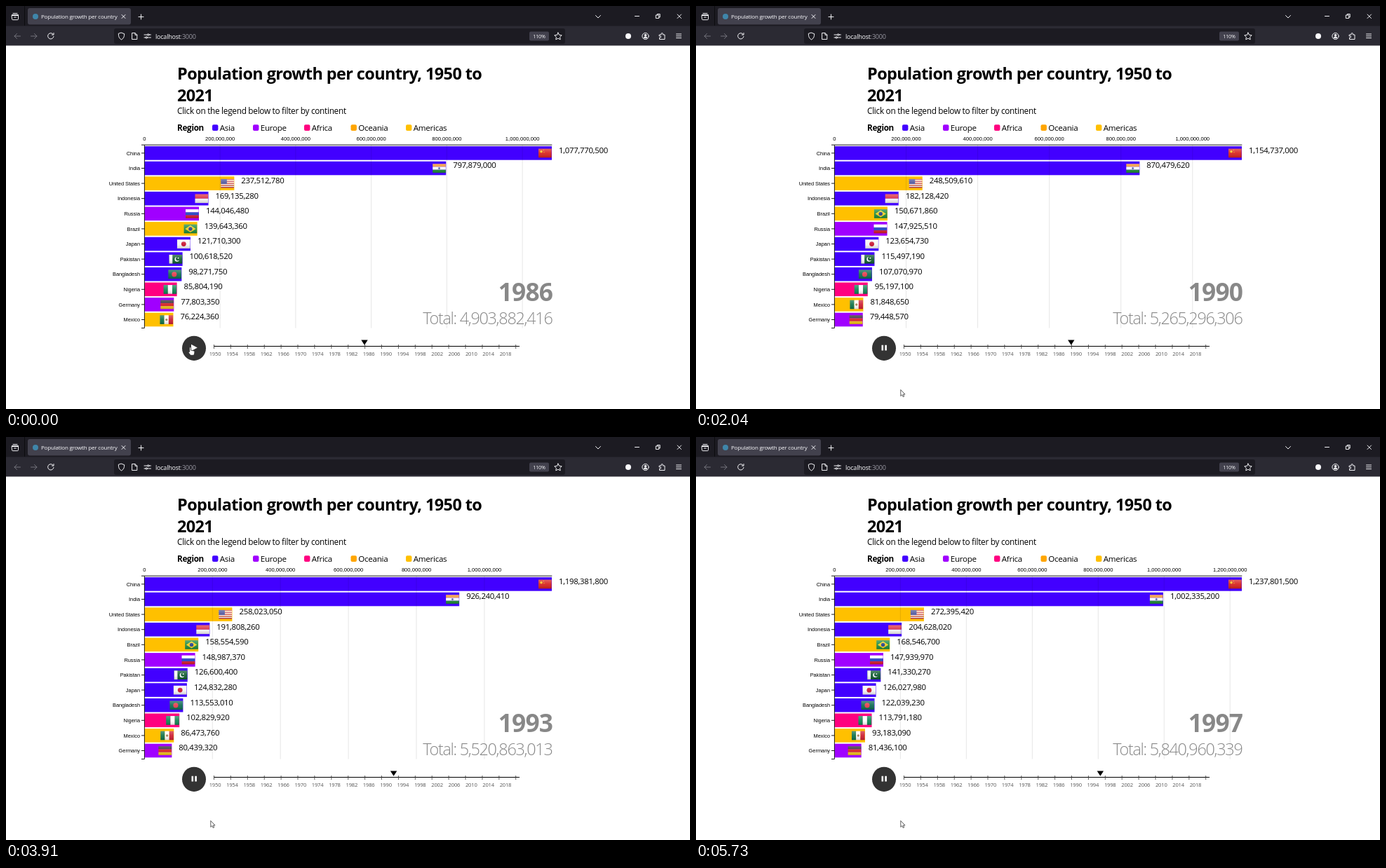
Recreate the animation shown at these times as an HTML page. Size 975 by 575 pixels, loop 5.81 s.

```html
<!DOCTYPE html>
<html lang="en">
<head>
<meta charset="utf-8">
<title>Population growth per country</title>
<style>
html, body { margin: 0; width: 100%; height: 100%; overflow: hidden; background: #fff; }
svg { display: block; }
text { font-family: "Open Sans", "Noto Sans", sans-serif; letter-spacing: -.024em; }
.axis { font: 7.6px "Liberation Sans", Arial, sans-serif; letter-spacing: 0; }
.name { font-size: 7.4px; }
.value { font-size: 11.4px; }
.bold { font-weight: 700; }
.mid { text-anchor: middle; }
.end { text-anchor: end; }
.icon { fill: none; stroke: #fbfbfe; stroke-width: .95; stroke-linecap: round; stroke-linejoin: round; }
</style>
</head>
<body>
<svg width="975" height="575" viewBox="0 0 975 575">
  <defs>
    <linearGradient id="shine" x2="0" y2="1">
      <stop offset="0" stop-color="#fff" stop-opacity=".3"/>
      <stop offset=".5" stop-color="#fff" stop-opacity=".08"/>
      <stop offset="1" stop-color="#000" stop-opacity=".16"/>
    </linearGradient>
  </defs>

  <g id="browser">
    <rect width="975" height="29" fill="#1c1b22"/>
    <rect y="28.5" width="975" height="28" fill="#2b2a33"/>
    <path d="M26.5 0V28" stroke="#0c0c0f"/>
    <rect x="31" y="3" width="147" height="23.5" rx="3" fill="#42414d"/>
    <circle cx="42" cy="15" r="4" fill="#3f86aa"/>
    <text x="50" y="18" font-size="8" fill="#fbfbfe">Population growth per country</text>
    <rect x="154" y="32" width="643" height="22" rx="3" fill="#1c1b22"/>
    <text x="213" y="46.5" font-size="9" fill="#fbfbfe">localhost<tspan fill="#9a99a3">:3000</tspan></text>
    <rect x="746" y="36.5" width="28" height="13" rx="2" fill="#42414d"/>
    <text x="760" y="45.7" font-size="7.2" fill="#fbfbfe" class="mid">110%</text>
    <g class="icon">
      <path d="M8.5 13.5h9v5q0 1.2-1.2 1.2h-6.6q-1.2 0-1.2-1.2zM8.5 13.5v-1h9v1M10 10.5h6M11.5 16h3"/>
      <path d="M165 12.5l5 5m0-5l-5 5M189 15.5h7m-3.5-3.5v7"/>
      <path d="M840.5 13.5l3.5 3.5l3.5-3.5M896.5 14.5h6M957 12l5.5 5.5m0-5.5l-5.5 5.5"/>
      <path d="M926.7 13h4v4.5h-4zM928.2 13v-1.5h4v4.5h-1.5"/>
      <path d="M20.5 43h-8.5m3.5-3.5l-3.5 3.5l3.5 3.5M35.5 43h8.5m-3.5-3.5l3.5 3.5l-3.5 3.5" stroke="#77767f"/>
      <path d="M67.2 40.3a4.2 4.2 0 1 0 .8 3.2M68 38.5v2.6h-2.6"/>
      <path d="M164.5 38.2l4.2 1.5c0 4.3-1.2 6.7-4.2 8.3c-3-1.6-4.2-4-4.2-8.3z"/>
      <path d="M180 38.5h4l2.8 2.8v6.2h-6.8zM184 38.5v2.8h2.8"/>
      <path d="M197 41h4.5M204 41h2.5M197 45h2M201.5 45h5"/>
      <circle cx="202.7" cy="41" r="1.2"/><circle cx="200.2" cy="45" r="1.2"/>
      <path d="M787 38l1.6 3.3l3.6 .5l-2.6 2.5l.6 3.6l-3.2-1.7l-3.2 1.7l.6-3.6l-2.6-2.5l3.6-.5z"/>
      <circle cx="911.5" cy="43" r="4.6"/>
      <g fill="#fbfbfe"><circle cx="911.5" cy="41.6" r="1.3"/><path d="M909.2 45.4a2.3 1.6 0 0 1 4.6 0z"/></g>
      <path d="M931.5 41h2.5v-1.2a1.2 1.2 0 0 1 2.4 0v1.2h2.6v6.5h-7.5v-2.5h1.2a1 1 0 0 0 0-2h-1.2z"/>
      <path d="M955.5 40h7M955.5 42.800h7M955.5 45.6h7"/>
    </g>
    <circle cx="887" cy="43" r="4" fill="#fbfbfe"/>
  </g>

  <text x="244" y="105.3" font-size="23.4" class="bold">Population growth per country, 1950 to</text>
  <text x="244" y="136" font-size="23.4" class="bold">2021</text>
  <text x="244" y="154.2" font-size="11.8">Click on the legend below to filter by continent</text>
  <text x="244" y="178" font-size="11.7" class="bold">Region</text>
  <g id="legend"></g>
  <g id="bars"></g>
  <g id="ticks"></g>
  <path d="M193 198.2H778.3M197.4 198.2V459.5H193" fill="none" stroke="#000" stroke-width=".9"/>
  <text id="year" class="end bold" x="779" y="421" font-size="35.3" fill="#888"></text>
  <text id="total" class="end" x="778.5" y="454" font-size="23.4" font-weight="300" fill="#888" style="letter-spacing:-.055em"></text>

  <g id="timeline"></g>
  <path id="marker" d="M-4.7-9h9.4l-4.7 7.3z"/>
  <ellipse cx="268" cy="488.3" rx="17" ry="17.6" fill="#333"/>
  <path id="play" d="M264 482.8l8.8 4.7l-8.8 4.7z" fill="#fff"/>
  <path id="pause" d="M264.5 483.8h2.6v7.6h-2.6zM269.3 483.8h2.6v7.6h-2.6z" fill="#fff"/>
  <path id="hand" d="M-.8 6.5V.8a1 1 0 0 1 2 0v3.4l4 .9q1.3.4 1.2 1.7l-.5 2.7l-.8 1.8h-4.6l-2.7-3.8q-.2-1.400 1.4-1z" fill="#fff" stroke="#222" stroke-width=".7"/>
  <path id="arrow" d="M0 0v9l2-1.8l1.4 3l1.5-.7l-1.4-2.9h2.7z" fill="#fff" stroke="#333" stroke-width=".8"/>
</svg>

<script>
const LOOP = 5810, FRAME = 78.1, CLICK = 170;
const FIRST = 1986, MID = 5, SPAN = 11;
const TICK_START = 570, TICK_GAP = 486, TWEEN = 480;
const X0 = 197.4, WIDTH = 580.6, TOP = 200.1, STEP = 21.6, BAND = 19.6;

const colors = { Asia: '#4200ff', Europe: '#a000ff', Africa: '#ff0080', Oceania: '#ffa500', Americas: '#ffc000' };

// Flag parts, on an 18.6 by 12.6 field.
const rect = (x, y, w, h, c) => `<rect x="${x}" y="${y}" width="${w}" height="${h}" fill="${c}"/>`;
const disc = (x, y, r, c) => `<circle cx="${x}" cy="${y}" r="${r}" fill="${c}"/>`;
const rows = (...cs) => cs.map((c, i) => rect(0, i * 12.6 / cs.length, 18.6, 12.6 / cs.length, c)).join('');
const cols = (...cs) => cs.map((c, i) => rect(i * 6.2, 0, 6.2, 12.6, c)).join('');
const stripes = Array.from({ length: 9 }, (_, i) => i % 2 ? '#fff' : '#c8405a');

// Name, region, population at the first, middle and last key year, flag.
const countries = [
  ['China', 'Asia', 1077770500, 1170626200, 1237801500,
    rows('#d8201c') + disc(4, 4, 1.7, '#f5c518') + disc(7.3, 2, .6, '#f5c518') + disc(8, 5, .6, '#f5c518')],
  ['India', 'Asia', 797879000, 888941760, 1002335200,
    rows('#f08c28', '#fff', '#1c8a34') + disc(9.3, 6.3, 1.5, '#5a62b0')],
  ['United States', 'Americas', 237512780, 251560200, 272395420,
    rows(...stripes) + rect(0, 0, 8.5, 7, '#46509a')],
  ['Indonesia', 'Asia', 169135280, 185361230, 204628020, rows('#dc2c40', '#f4f4f4')],
  ['Russia', 'Europe', 144046480, 148455410, 147939970, rows('#fff', '#1c40c0', '#d41c28')],
  ['Brazil', 'Americas', 139643360, 153336450, 168546700,
    rows('#1c8a3c') + '<path d="M9.3 1.3L17 6.3L9.3 11.3L1.6 6.3z" fill="#f4d020"/>' + disc(9.3, 6.3, 2.7, '#24408c')],
  ['Japan', 'Asia', 121710300, 124073990, 126027980, rows('#f6f6f6') + disc(9.3, 6.3, 3.4, '#c8102e')],
  ['Pakistan', 'Asia', 100618520, 119203576, 141330270,
    rows('#0c5a2c') + rect(0, 0, 4.7, 12.6, '#f6f6f6') + disc(11.2, 6.5, 3.3, '#fff')
    + disc(12.3, 5.6, 2.8, '#0c5a2c') + disc(13, 4.8, .9, '#fff')],
  ['Bangladesh', 'Asia', 98271750, 109242830, 122039230, rows('#0c6a50') + disc(8.5, 6.3, 3.6, '#e83a4c')],
  ['Nigeria', 'Africa', 85804190, 97685360, 113791180, cols('#0c8450', '#fff', '#0c8450')],
  ['Germany', 'Europe', 77803350, 79801980, 81436100, rows('#282828', '#d41c1c', '#f4c418')],
  ['Mexico', 'Americas', 76224360, 83351600, 93183090,
    cols('#0c7048', '#fff', '#cc1c30') + disc(9.3, 6.3, 1.7, '#a08050')],
];

const $ = id => document.getElementById(id);
const list = (n, fn) => Array.from({ length: n }, (_, i) => fn(i));
const clamp = v => Math.min(1, Math.max(0, v));
const lerp = (a, b, p) => a + (b - a) * p;
const ease = u => u < .5 ? 4 * u ** 3 : 1 - 4 * (1 - u) ** 3;
const group = n => n.toLocaleString('en-US');
const move = (el, x, y) => el.setAttribute('transform', `translate(${x.toFixed(2)} ${y.toFixed(2)})`);
const show = (el, on) => el.setAttribute('visibility', on ? 'visible' : 'hidden');

// Smooth growth: the parabola through three key years.
function grow(a, b, c, k, unit) {
  const early = (b - a) / MID, late = (c - b) / (SPAN - MID);
  const v = a + early * k + (late - early) / SPAN * k * (k - MID);
  return k % MID && k !== SPAN ? Math.round(v / unit) * unit : Math.round(v);
}

// Settled layout, k years after the first.
function layout(k) {
  const values = countries.map(([, , a, b, c]) => grow(a, b, c, k, a > 1e9 ? 100 : 10));
  const sorted = [...values].sort((a, b) => b - a);
  return {
    values, max: sorted[0],
    total: grow(4903882416, 5351960800, 5840960339, k, 1),
    width: values.map(v => v / sorted[0] * WIDTH),
    y: values.map(v => TOP + sorted.indexOf(v) * STEP),
  };
}
const years = list(SPAN + 1, layout);

const legendX = [294, 352, 425, 491.5, 570];
$('legend').innerHTML = Object.entries(colors).map(([name, color], i) =>
  `<rect x="${legendX[i]}" y="169.3" width="8.4" height="8.6" rx="2" fill="${color}"/>
   <text x="${legendX[i] + 10.8}" y="178" font-size="11.6">${name}</text>`).join('');

$('bars').innerHTML = countries.map(([name, region, , , , flag]) => `<g>
  <text class="axis name end" x="191" y="12.5">${name}</text>
  <path d="M193 9.8H197" stroke="#000" stroke-width=".9"/>
  <rect x="${X0}" height="${BAND}" fill="${colors[region]}"/>
  <g><g transform="translate(-19 3.6)">${flag}${rect(0, 0, 18.6, 12.6, 'url(#shine)')}</g>
  <text class="value" x="10" y="9.7"></text></g></g>`).join('');
const bars = [...$('bars').children].map(el => ({
  el, rect: el.querySelector('rect'), tip: el.querySelector('g'), value: el.querySelector('.value'),
}));

const tickValues = list(7, i => i * 2e8);
$('ticks').innerHTML = tickValues.map(v => `<g>
  <path d="M0 198V459.5" stroke="#000" stroke-opacity="${v ? .1 : 0}"/>
  <text class="axis mid" y="191.7">${group(v)}</text></g>`).join('');
const ticks = [...$('ticks').children];

$('timeline').innerHTML = '<path d="M296 485.5H732" stroke="#000" stroke-width="1.2"/>'
  + list(19, i => `<path d="M${296.5 + i * 23.9} 483V489" stroke="#333" stroke-width=".8"/>`).join('')
  + list(18, i => `<text class="mid" x="${298 + i * 24.35}" y="499.3" font-size="7.6" fill="#555">${1950 + i * 4}</text>`).join('');

// The recording starts at the click and refreshes at a fixed rate.
const snap = t => t < CLICK ? 0 : CLICK + Math.floor((t - CLICK) / FRAME + .25) * FRAME;

function drawChart(t) {
  const n = Math.min(SPAN, Math.max(0, Math.floor((t - TICK_START) / TICK_GAP) + 1));
  const now = years[n], before = years[Math.max(0, n - 1)];
  const p = n ? ease(clamp((t - TICK_START - (n - 1) * TICK_GAP) / TWEEN)) : 1;

  bars.forEach((bar, i) => {
    const w = lerp(before.width[i], now.width[i], p);
    move(bar.el, 0, lerp(before.y[i], now.y[i], p));
    bar.rect.setAttribute('width', w.toFixed(2));
    move(bar.tip, X0 + w, 0);
    bar.value.textContent = group(now.values[i]);
  });

  ticks.forEach((tick, i) => {
    const v = tickValues[i];
    move(tick, X0 + lerp(v / before.max, v / now.max, p) * WIDTH, 0);
    tick.setAttribute('opacity', v > now.max ? 0 : v > before.max ? p : 1);
  });

  $('year').textContent = FIRST + n;
  $('total').textContent = 'Total: ' + group(now.total);
  move($('marker'), 511 + n * 5.94, 485.5);
}

function drawPointer(t) {
  show($('play'), t < CLICK);
  show($('pause'), t >= CLICK);
  const q = ease(clamp((t - 240) / 400));
  const x = lerp(262.5, 291.8, q), y = lerp(487, 547.5, q);
  const onButton = y < 506;
  show($('hand'), onButton);
  show($('arrow'), !onButton);
  move($('hand'), x, y);
  move($('arrow'), x, y);
}

const start = performance.now();
function frame() {
  const t = snap((performance.now() - start) % LOOP);
  drawChart(t);
  drawPointer(t);
  requestAnimationFrame(frame);
}
frame();
</script>
</body>
</html>
```
